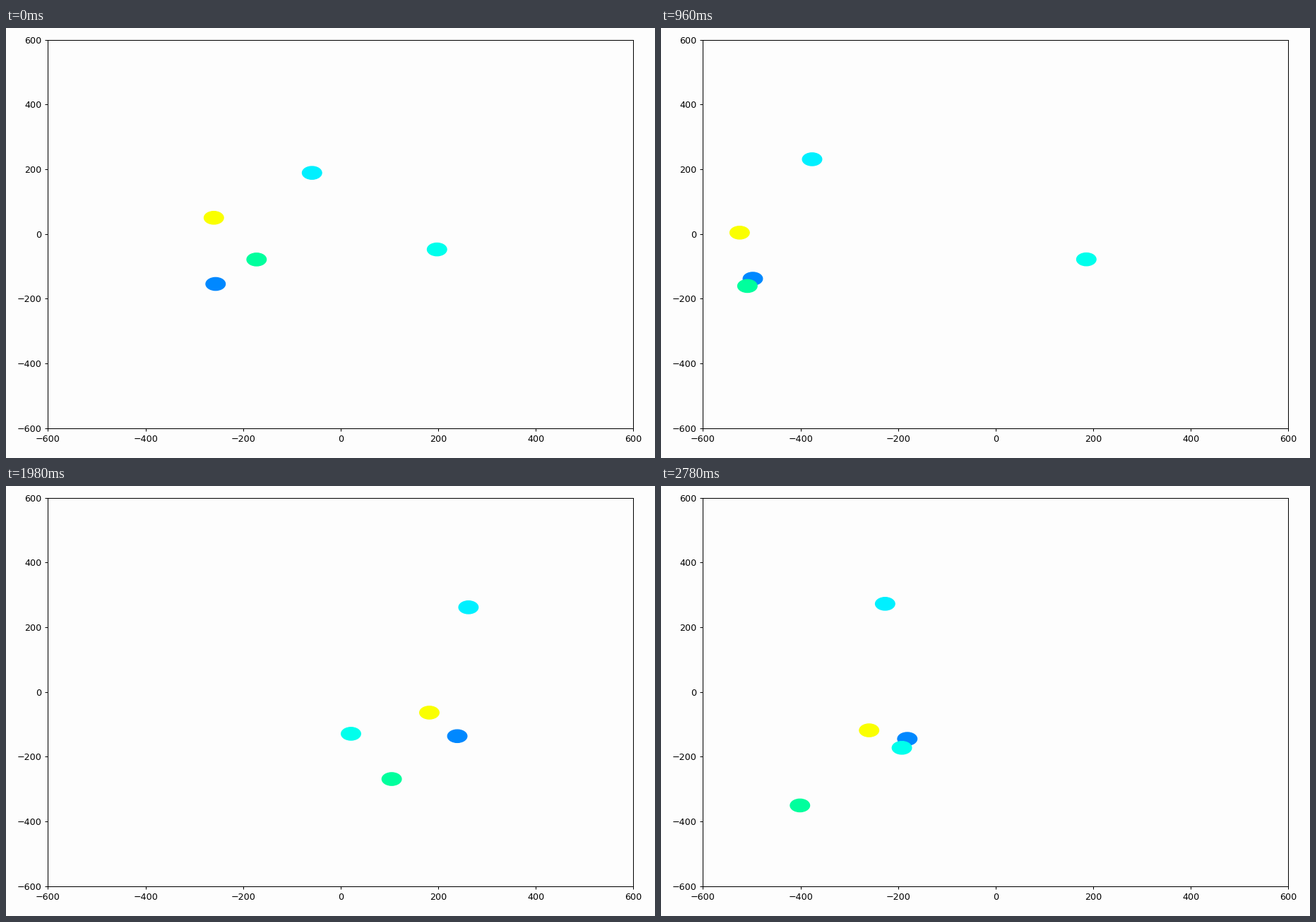
A matplotlib script for the animation above (2800 ms loop, 919 by 609 pixels).

```python
import numpy as np
import matplotlib.pyplot as plt
from matplotlib.animation import FuncAnimation

W, H, DPI = 919, 609, 92
STEP, FRAMES = 20, 140
LIMIT = 600
PAPER = "#fdfdfd"

# (milliseconds, simulation steps): the simulation speeds up, stalling once
CLOCK = [(0, 0), (580, 12.2), (960, 22.2), (1420, 40.1), (1560, 46.8),
         (1660, 46.8), (1980, 65.2), (2520, 90.4), (2780, 104.4)]

# all members share a drift; each one's own velocity fades away over time
DRIFT = np.array([-10.557, -0.904])
FADE = np.array([16.0, 7.0])

# colour, start, own velocity
FLOCK = [
    ("#0088ff", (-256.4, -154.5), (-0.405, 2.485)),
    ("#00f0ff", (-58.8, 188.8), (-4.763, 4.253)),
    ("#faff00", (-260.0, 50.0), (-1.744, -1.773)),
    ("#00ff9d", (-172.4, -78.9), (-5.855, -4.239)),
    ("#00ffec", (197.4, -47.8), (12.772, -0.726)),
]


def wrap(x):
    return (x + LIMIT) % (2 * LIMIT) - LIMIT


def position(start, own, s):
    """Own velocity falls off as 1 / sqrt(1 + s / FADE), integrated here."""
    reach = 2 * FADE * (np.sqrt(1 + s / FADE) - 1)
    x, y = np.array(start) + DRIFT * s + np.array(own) * reach
    return wrap(x), y


def last_change(k):
    """Three quick pictures, then a hold, every seven ticks."""
    while k % 7 not in (6, 0, 1):
        k -= 1
    return k


fig = plt.figure(figsize=((W + 0.01) / DPI, (H + 0.01) / DPI), dpi=DPI, facecolor=PAPER)
ax = fig.add_axes([59.4 / W, 42.3 / H, 829 / W, 550 / H], facecolor=PAPER)
ax.set(xlim=(-LIMIT, LIMIT), ylim=(-LIMIT, LIMIT))
ticks = range(-LIMIT, LIMIT + 1, 200)
ax.set_xticks(ticks)
ax.set_yticks(ticks)

balls = [ax.add_patch(plt.Circle(start, 20, color=color)) for color, start, _ in FLOCK]


def draw(k):
    s = np.interp(last_change(k) * STEP, *zip(*CLOCK))
    for ball, (_, start, own) in zip(balls, FLOCK):
        ball.center = position(start, own, s)
    return balls


anim = FuncAnimation(fig, draw, frames=FRAMES, interval=STEP,
                     init_func=lambda: draw(0), repeat=True, repeat_delay=0)
plt.show()
```
